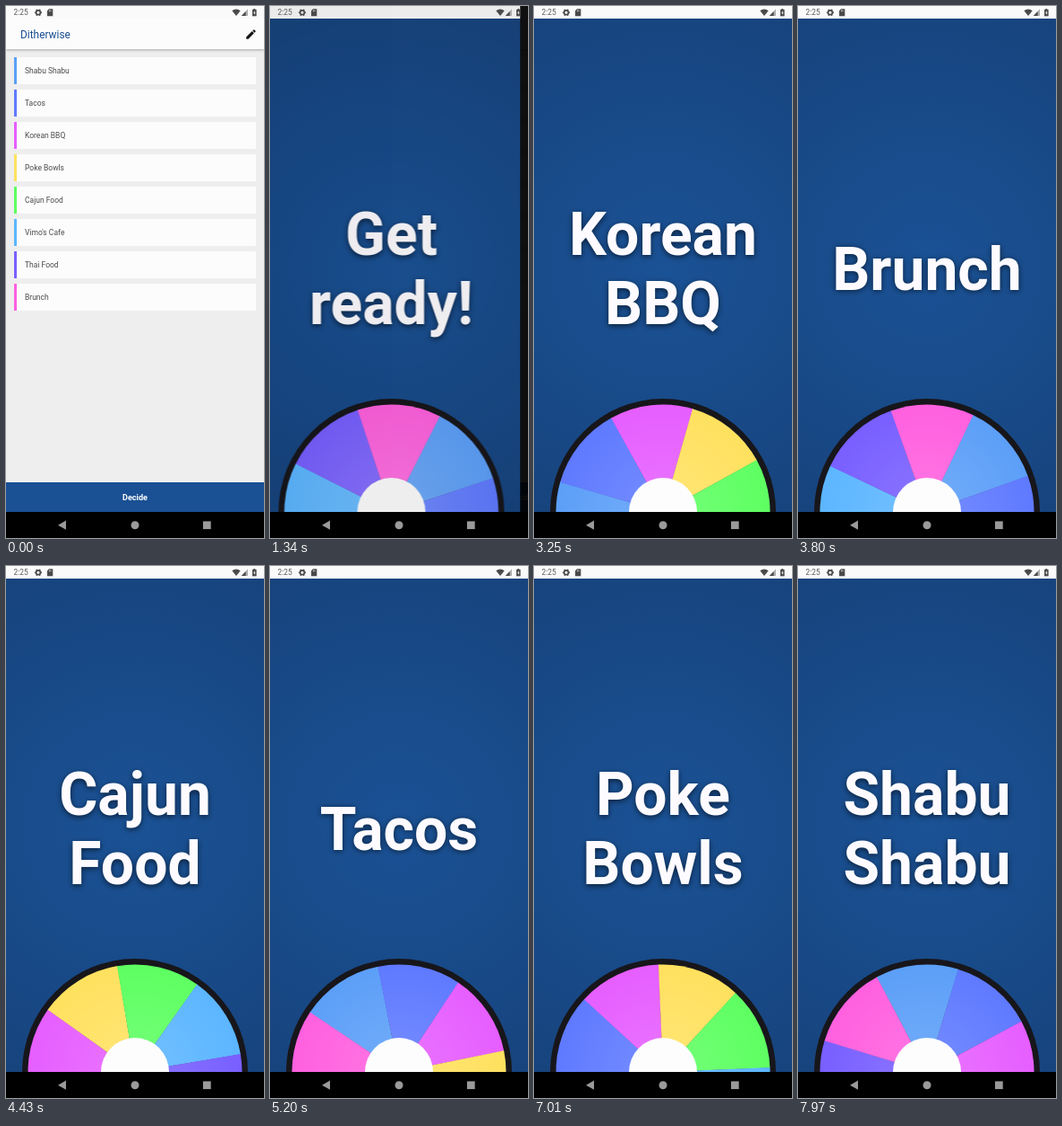
Recreate the animation shown at these times as an HTML page with a canvas. Size 288 by 592 pixels, loop 8000 ms.

```html
<!DOCTYPE html>
<html lang="en">
<head>
<meta charset="utf-8">
<title>Decision wheel</title>
<style>
  html, body { margin: 0; width: 100%; height: 100%; overflow: hidden; background: #000; }
  #stage { position: relative; width: 288px; height: 592px; overflow: hidden; background: #000; }
  canvas { position: absolute; left: 0; top: 0; width: 288px; height: 592px; }
</style>
</head>
<body>
<div id="stage">
  <canvas id="list"></canvas>
  <canvas id="spin"></canvas>
  <canvas id="system"></canvas>
</div>
<script>
const W = 288, H = 592, LOOP = 8000, NAV = 563, STATUS = 14;
const SLIDE = { start: 1088, length: 300 };
const READY_UNTIL = 1430;
const FONT = 'Roboto, "Open Sans", sans-serif';

const ITEMS = [
  ['Shabu Shabu', '#5c9ff8'],
  ['Tacos', '#5f7aff'],
  ['Korean BBQ', '#e65eff'],
  ['Poke Bowls', '#ffe15f'],
  ['Cajun Food', '#5eff62'],
  ["Vimo's Cafe", '#5cb6ff'],
  ['Thai Food', '#785fff'],
  ['Brunch', '#ff60df']
];

// Wheel motion: time, degrees, degrees per ms
const SPIN = [
  [1100, 0, 0.1],
  [1340, 48.9, 0.34],
  [3250, 623.4, 0.27],
  [4430, 912.8, 0.205],
  [5200, 1046, 0.168],
  [6140, 1202, 0.155],
  [7970, 1434.4, 0.1]
];

const scale = Math.max(1, window.devicePixelRatio || 1);

function layer(id) {
  const el = document.getElementById(id);
  el.width = W * scale;
  el.height = H * scale;
  const g = el.getContext('2d');
  g.scale(scale, scale);
  return { el, g };
}

const list = layer('list'), spin = layer('spin'), system = layer('system');

function rect(g, x, y, w, h, color) {
  g.fillStyle = color;
  g.fillRect(x, y, w, h);
}

function disc(g, x, y, r, color) {
  g.fillStyle = color;
  g.beginPath();
  g.arc(x, y, r, 0, Math.PI * 2);
  g.fill();
}

function shape(g, points, color) {
  g.fillStyle = color;
  g.beginPath();
  points.forEach(([x, y]) => g.lineTo(x, y));
  g.closePath();
  g.fill();
}

function text(g, str, x, y, size, weight, color, align = 'left') {
  g.font = `${weight} ${size}px ${FONT}`;
  g.textAlign = align;
  g.fillStyle = color;
  g.fillText(str, x, y);
}

function drawList(g) {
  rect(g, 0, 0, W, NAV, '#eeeeee');
  g.save();
  g.shadowColor = 'rgba(0,0,0,.3)';
  g.shadowBlur = 3 * scale;
  g.shadowOffsetY = scale;
  rect(g, 0, 0, W, 48, '#fcfcfc');
  g.restore();
  rect(g, 0, 0, W, STATUS, '#fafafa');
  text(g, 'Ditherwise', 16, 36, 11.9, 400, '#1a4f93');

  g.save();
  g.translate(266.5, 24.5);
  g.scale(0.583, 0.583);
  g.fillStyle = '#111';
  g.fill(new Path2D('M3 17.25V21h3.75L17.8 9.95l-3.75-3.75zM20.7 7.05c.4-.4.4-1 0-1.4l-2.35-2.35c-.4-.4-1-.4-1.4 0l-1.85 1.85 3.75 3.75z'));
  g.restore();

  ITEMS.forEach(([name, color], i) => {
    const y = 57 + i * 36;
    rect(g, 9, y, 270, 30, '#fcfcfc');
    rect(g, 9, y, 3, 30, color);
    text(g, name, 21, y + 18.3, 8.5, 400, '#4c4c4c');
  });

  rect(g, 0, 530, W, NAV - 530, '#1a5094');
  text(g, 'Decide', 144, 550, 9.1, 700, '#fff', 'center');
}

function drawSystem(g) {
  const ink = '#4a4a4a';
  text(g, '2:25', 8.5, 10.4, 8.4, 400, '#5a5a5a');

  // gear
  g.strokeStyle = ink;
  g.lineWidth = 1.7;
  g.beginPath();
  g.arc(36, 7.3, 2.4, 0, Math.PI * 2);
  g.stroke();
  for (let i = 0; i < 6; i++) {
    const a = i * Math.PI / 3;
    disc(g, 36 + Math.cos(a) * 3.4, 7.3 + Math.sin(a) * 3.4, 0.8, ink);
  }

  // memory card
  shape(g, [[48, 3.2], [52.3, 3.2], [52.3, 11.2], [46, 11.2], [46, 5.2]], ink);
  rect(g, 48, 4.5, 0.8, 1.7, '#ddd');
  rect(g, 49.5, 4.5, 0.8, 1.7, '#ddd');

  // wifi, signal, battery
  g.fillStyle = ink;
  g.beginPath();
  g.moveTo(257, 11);
  g.lineTo(252.3, 5.2);
  g.quadraticCurveTo(257, 1.8, 261.7, 5.2);
  g.closePath();
  g.fill();
  shape(g, [[270, 3.2], [270, 11], [262.8, 11]], '#b0b0b0');
  shape(g, [[267.6, 5.9], [267.6, 11], [262.8, 11]], ink);
  rect(g, 275, 4, 4.6, 7.3, ink);
  rect(g, 276.3, 3, 2, 1.2, ink);
  shape(g, [[277.6, 5.2], [276, 8], [277.1, 8], [277, 10], [278.6, 7.2], [277.6, 7.2]], '#eee');

  rect(g, 0, NAV, W, H - NAV, '#000');
  const key = '#9a9a9a';
  shape(g, [[58, 577.7], [67, 572.6], [67, 582.8]], key);
  disc(g, 144, 577.7, 4.5, key);
  rect(g, 220, 573.4, 8.7, 8.7, key);
}

function angleAt(t) {
  if (t <= SPIN[0][0]) return SPIN[0][1];
  const last = SPIN[SPIN.length - 1];
  if (t >= last[0]) return last[1] + (t - last[0]) * last[2];
  const i = SPIN.findIndex(k => k[0] > t);
  const [t0, a0, v0] = SPIN[i - 1], [t1, a1, v1] = SPIN[i];
  const d = t1 - t0, u = (t - t0) / d, u2 = u * u, u3 = u2 * u;
  return a0 * (2 * u3 - 3 * u2 + 1) + v0 * d * (u3 - 2 * u2 + u)
    + a1 * (3 * u2 - 2 * u3) + v1 * d * (u3 - u2);
}

function drawWheel(g, angle) {
  const x = 144, y = 563, r = 119.5, step = Math.PI / 4;
  disc(g, x, y, 126, '#17161b');
  ITEMS.forEach(([, color], i) => {
    const mid = (angle - 90) * Math.PI / 180 + i * step;
    g.fillStyle = color;
    g.beginPath();
    g.moveTo(x, y);
    g.arc(x, y, r, mid - step / 2 - 0.002, mid + step / 2 + 0.002);
    g.fill();
  });
  const glow = g.createRadialGradient(x, y, 38, x, y, r);
  glow.addColorStop(0, 'rgba(255,255,255,.1)');
  glow.addColorStop(1, 'rgba(255,255,255,0)');
  disc(g, x, y, r, glow);
  disc(g, x, y, 38, '#fdfdfd');
}

function drawLabel(g, label) {
  const lines = label.split(' '), pitch = 77;
  const first = 315.5 - (lines.length - 1) * pitch / 2;
  g.save();
  g.shadowColor = 'rgba(0,0,0,.6)';
  g.shadowBlur = 6 * scale;
  g.shadowOffsetY = 1.5 * scale;
  lines.forEach((line, i) => text(g, line, 144, first + i * pitch, 66, 700, '#fdfbff', 'center'));
  g.restore();
}

function drawSpin(g, t) {
  const back = g.createRadialGradient(144, 289, 0, 144, 289, 320);
  back.addColorStop(0, '#1a5296');
  back.addColorStop(1, '#17437c');
  rect(g, 0, 0, W, NAV, back);
  rect(g, 0, 0, W, STATUS, '#fafafa');

  const angle = angleAt(t);
  const top = ((Math.round(-angle / 45) % 8) + 8) % 8;
  drawLabel(g, t < READY_UNTIL ? 'Get ready!' : ITEMS[top][0]);
  drawWheel(g, angle);
}

function place(el, x, alpha) {
  el.style.transform = `translateX(${x}px)`;
  el.style.opacity = alpha;
}

function frame(now) {
  const t = now % LOOP;
  const u = Math.min(1, Math.max(0, (t - SLIDE.start) / SLIDE.length));
  const p = 0.5 - Math.cos(u * Math.PI) / 2;
  place(list.el, p * W / 2, 1 - p);
  place(spin.el, (p - 1) * W / 2, p);
  if (p > 0) drawSpin(spin.g, t);
  requestAnimationFrame(frame);
}

drawList(list.g);
drawSystem(system.g);
requestAnimationFrame(frame);
</script>
</body>
</html>
```
